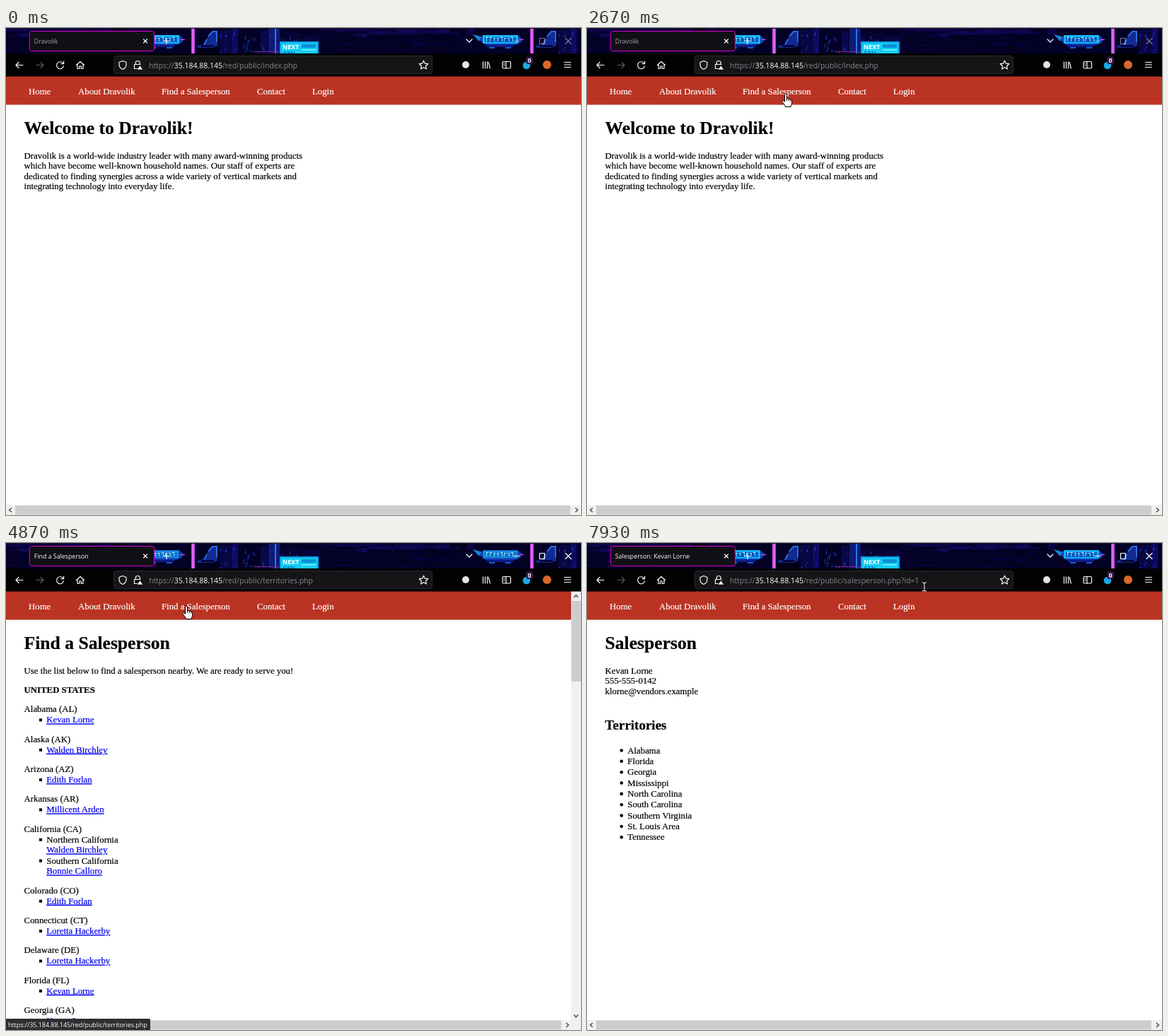
An HTML page that plays this animation: 813 by 689 pixels, repeating every 8 s.

```html
<!DOCTYPE html>
<html lang="en">
<head>
<meta charset="utf-8">
<title>Browser session</title>
<style>
html, body { margin: 0; width: 100%; height: 100%; overflow: hidden; background: #fff; }
#stage { position: absolute; left: 0; top: 0; width: 813px; height: 689px; overflow: hidden; }
svg { position: absolute; left: 0; top: 0; display: block; }
text { white-space: pre; }
.page text { font-family: "Liberation Serif", "Times New Roman", serif; stroke: #000; stroke-width: .2; }
.page .nav { fill: #fff; stroke: #fff; }
.page .link { fill: #0000ee; stroke: #0000ee; text-decoration: underline; }
.ui, #status { font-family: "Open Sans", "Noto Sans", sans-serif; }
.icon { fill: none; stroke: #fbfbfe; stroke-width: 1.2; stroke-linecap: round; stroke-linejoin: round; }
#status {
  position: absolute; left: 0; top: 673px; height: 16px; padding: 0 4px 0 3px;
  border-radius: 0 2px 0 0; background: #2e2e31; color: #fbfbfe;
  font-size: 8.9px; line-height: 17px; white-space: pre;
}
</style>
</head>
<body>
<div id="stage">
  <svg id="screen" width="813" height="689" viewBox="0 0 813 689"></svg>
  <div id="status"></div>
  <svg id="pointer" width="813" height="689" viewBox="0 0 813 689">
    <g id="cursor" stroke="#000" fill="#fff" stroke-width="1" stroke-linejoin="round">
      <path id="arrow" d="M0 0V15.5L3.6 12.2L6 18L8.6 16.9L6.2 11.3H11Z"/>
      <g id="hand">
        <path d="M-1.5 1.3a1.5 1.5 0 0 1 3 0V6.8q2-.8 2.8.6q2-.6 2.6.8q1.7-.3 1.8 1.6V13q0 2-1.4 3.6V18.5H-.8V17L-5 11.5q-.8-1.8.8-2q1-.1 2.7 1.9Z"/>
        <path d="M1.5 6.8V10M4.3 7.5V10.3M6.9 8.3V10.6" fill="none"/>
      </g>
      <path id="beam" fill="none" stroke="#fff" d="M-3 -6H-1L0 -5L1 -6H3M0 -5V5M-3 6H-1L0 5L1 6H3"/>
    </g>
  </svg>
</div>
<script>
const LOOP = 8000;
const HOST = '35.184.88.145';
const COMPANY = 'Dravolik';
const SELLER = 'Kevan Lorne';
const $ = id => document.getElementById(id);

// Markup helpers
const rect = (x, y, w, h, fill, extra = '') =>
  `<rect x="${x}" y="${y}" width="${w}" height="${h}" fill="${fill}" ${extra}/>`;
const text = (x, y, str, size = 12.8, extra = '') =>
  `<text x="${x}" y="${y}" font-size="${size}" ${extra}>${str}</text>`;
const line = (d, extra = '') => `<path d="${d}" ${extra}/>`;
const bold = 'font-weight="bold"';

let seed = 11;
const rnd = n => {
  seed = (seed * 16807) % 2147483647;
  return Math.floor(seed / 2147483647 * n);
};
const scatter = (count, x, y, w, h, pw, ph, colors) => Array.from({ length: count }, () =>
  rect(x + rnd(w / 2) * 2, y + rnd(h), 1 + rnd(pw), 1 + rnd(ph), colors[rnd(colors.length)])).join('');

function cityTile() {
  const tower = (x, y, w, fill) => rect(x, y, w, 36 - y, fill)
    + scatter(w * .7, x + 1, y + 2, w - 3, 33 - y, 1, 5, ['#17239b', '#1b45c8', '#0a0640']);
  return rect(262, 0, 480, 36, '#040127')
    + rect(446, 0, 216, 9, '#0c0546')
    + scatter(46, 446, 0, 200, 11, 22, 4, ['#040127', '#110754', '#02011a'])
    + scatter(30, 446, 14, 196, 22, 26, 3, ['#020115', '#07023a'])
    + rect(262, 0, 5, 36, '#c64be0') + rect(264, 0, 1, 36, '#ef8bf3')
    + line('M270 25L280 23L285 13L291 5H299V25L288 30L271 28Z', 'fill="#122a91"')
    + line('M286 12L292 5H298V20M284 16L280 24', 'fill="none" stroke="#2b69e8" stroke-width="2"')
    + rect(269, 28, 31, 8, '#02001a') + rect(276, 24, 18, 3, '#060738')
    + tower(302, 3, 16, '#090645') + tower(319, 0, 9, '#0c0b63')
    + tower(331, 9, 28, '#040127') + tower(360, 4, 10, '#090848')
    + tower(371, 0, 16, '#0f1a78') + tower(388, 6, 30, '#060334')
    + tower(420, 10, 24, '#08043c') + rect(380, 0, 2, 36, '#2878e8')
    + rect(350, 33, 36, 1, '#8a2478')
    + rect(387, 19, 55, 17, '#0a9fe0') + rect(389, 21, 51, 15, '#14cdf3')
    + rect(418, 23, 20, 5, '#0b8fd6') + rect(418, 30, 20, 2, '#62efff')
    + text(391, 30, 'NEXT', 9, 'class="ui" fill="#fff" ' + bold)
    + text(391, 38.5, 'GEN', 8.5, 'class="ui" fill="#0878c8" ' + bold)
    + line('M660 9L668 18H674V13Z', 'fill="#1488d8"')
    + line('M669 17L675 10H723L731 16L727 21L720 24H678Z', 'fill="#123ab6"')
    + rect(679, 24, 38, 3, '#0c1c81') + rect(683, 27, 8, 2, '#1b5ad8') + rect(706, 27, 8, 2, '#1b5ad8')
    + rect(725, 16, 7, 1, '#e14bd0')
    + rect(675, 11, 48, 10, '#1c7fd2')
    + '<g class="glow">' + rect(674, 10, 50, 12, '#15b9fa') + rect(677, 13, 44, 7, '#0d58bd') + '</g>'
    + Array.from({ length: 8 }, (_, i) => rect(679 + i * 5, 13 + rnd(2), 3, 1, '#b5f8ff')
      + rect(679 + i * 5 + rnd(3), 14, 1, 5, '#62e4ff')).join('');
}

function banner() {
  return `<defs><g id="city">${cityTile()}</g><clipPath id="bar"><rect width="813" height="36"/></clipPath></defs>
    <g clip-path="url(#bar)"><use href="#city" x="-479"/><use href="#city"/><use href="#city" x="479"/></g>`
    + rect(0, 0, 813, 1, '#17152a');
}

function chrome() {
  const controls = '<g id="controls" class="icon" stroke-linecap="butt">'
    + line('M754.5 14.5h7v8h-7zM791 14.5l8 8M799 14.5l-8 8M718 18.5h8') + '</g>';
  return banner()
    + rect(33.5, 4.5, 176, 28, '#100f16', 'rx="3" stroke="#e000d0"')
    + '<text id="tab" class="ui" y="22" font-size="8.8"></text>'
    + '<circle id="dot" cx="50.5" cy="18.5" r="1.2" fill="#ddd"/>'
    + '<g class="icon">' + line('M194.5 16l5 5M199.5 16l-5 5M223 18.5h8M227 14.5v8M651 16l4 4l4-4') + '</g>'
    + controls
    + rect(0, 36, 813, 32.6, '#020203')
    + rect(152.5, 39.5, 450, 25, '#151517', 'rx="3" stroke="#29292c"')
    + '<g class="icon">'
    + line('M24 52.5H14M18 48.5l-4 4l4 4')
    + line('M43 52.5H53M49 48.5l4 4l-4 4', 'stroke="#5c5c62"')
    + '<g id="reload">' + line('M80.8 50a5 5 0 1 0 .7 3.8M81.6 47v3.6H78') + '</g>'
    + '<g id="stop">' + line('M72.5 48.5l8 8M80.5 48.5l-8 8') + '</g>'
    + line('M99.5 52.5l5.5-5l5.5 5M101 51.5V57.5H103.7V54H106.3V57.5H109V51.5')
    + line('M165 46.5l5 2v3q0 5-5 7q-5-2-5-7v-3z')
    + line('M183.2 51V49.5a3 3 0 0 1 6 0V51M187 57.5H181.5V51.5H190')
    + line('M189.5 53l4 6h-8z', 'fill="#fbfbfe" stroke="#151517" stroke-width=".6"')
    + line('M590.5 46.2l1.9 4l4.3.5l-3.2 3l.9 4.3l-3.9-2.2l-3.9 2.2l.9-4.3l-3.2-3l4.3-.5z')
    + line('M674.5 47.5v10M677.5 47.5v10M680.5 47.5v10M682 48l2.5 9.5', 'stroke-linecap="butt"')
    + rect(702, 47.5, 11.5, 9.5, 'none', 'rx="1.5"') + line('M707 47.5V57M704 50h1M704 52.5h1')
    + line('M789.5 48.5h9M789.5 52h9M789.5 55.5h9')
    + '</g>'
    + '<circle cx="650" cy="52" r="5" fill="#e4e4e8"/><circle cx="736" cy="53" r="5.3" fill="#18a9e8"/><circle cx="765" cy="52" r="6" fill="#d9682a"/>'
    + '<g id="badge">' + rect(735.5, 40.5, 9.5, 10.5, '#3b174f', 'rx="2"')
    + text(740.2, 49, '0', 8.4, 'class="ui" text-anchor="middle" fill="#fff" ' + bold) + '</g>'
    + `<text class="ui" x="202" y="56.7" font-size="10.48" fill="#85858c">https://<tspan fill="#fbfbfe">${HOST}</tspan><tspan id="path"></tspan></text>`;
}

const navLinks = [[32, 'Home'], [102, 'About ' + COMPANY], [220, 'Find a Salesperson'], [355, 'Contact'], [433, 'Login']];
const bar = width => rect(0, 68, width, 40.6, '#bb3323')
  + navLinks.map(([x, label]) => text(x, 94.3, label, 12.8, 'class="nav"')).join('');
const heading = label => text(25.6, 150, label, 25.6, bold);
const paragraph = lines => lines.map((str, i) => text(25.6, 184.8 + i * 14.4, str)).join('');
const chevron = d => line(d, 'fill="none" stroke="#505050" stroke-width="1.6"');
const bottomScroll = end => rect(0, 675, 813, 14, '#f0f0f0') + rect(13, 675.5, end - 13, 13, '#cdcdcd')
  + chevron(`M8 679l-3.3 3l3.3 3M${end + 7} 679l3.3 3l-3.3 3`);

function homePage() {
  return bar(813) + heading(`Welcome to ${COMPANY}!`) + paragraph([
    `${COMPANY} is a world-wide industry leader with many award-winning products`,
    'which have become well-known household names. Our staff of experts are',
    'dedicated to finding synergies across a wide variety of vertical markets and',
    'integrating technology into everyday life.'
  ]) + bottomScroll(798);
}

function territoriesPage() {
  const walden = 'Walden Birchley', edith = 'Edith Forlan', loretta = 'Loretta Hackerby';
  const states = [
    ['Alabama (AL)', SELLER], ['Alaska (AK)', walden], ['Arizona (AZ)', edith],
    ['Arkansas (AR)', 'Millicent Arden'],
    ['California (CA)', walden, 'Northern California', 'Bonnie Calloro', 'Southern California'],
    ['Colorado (CO)', edith], ['Connecticut (CT)', loretta], ['Delaware (DE)', loretta],
    ['Florida (FL)', SELLER], ['Georgia (GA)', SELLER]
  ];
  const bullet = y => rect(47, y - 6, 4, 4, '#000');
  const link = (y, name) => text(57.3, y, name, 12.8, 'class="link"');
  let y = 239.2, list = '';
  for (const [state, first, area, second, area2] of states) {
    list += text(25.6, y, state) + bullet(y + 15.2);
    if (area) {
      list += text(57.3, y + 15.2, area) + link(y + 29.8, first)
        + bullet(y + 45) + text(57.3, y + 45, area2) + link(y + 59.8, second);
      y += 44.6;
    } else list += link(y + 15.2, first);
    y += 42.35;
  }
  return bar(799) + heading('Find a Salesperson')
    + paragraph(['Use the list below to find a salesperson nearby. We are ready to serve you!'])
    + text(25.6, 212, 'UNITED STATES', 12.8, bold) + list + bottomScroll(785)
    + rect(799, 69, 14, 606, '#f0f0f0') + rect(799.5, 82, 13.5, 114, '#cdcdcd')
    + chevron('M803 77l3-3.3l3 3.3M803 667.5l3 3.3l3-3.3');
}

function salesPage() {
  const areas = ['Alabama', 'Florida', 'Georgia', 'Mississippi', 'North Carolina',
    'South Carolina', 'Southern Virginia', 'St. Louis Area', 'Tennessee'];
  return bar(813) + heading('Salesperson')
    + paragraph([SELLER, '555-555-0142', 'klorne@vendors.example'])
    + text(25.6, 264, 'Territories', 19, bold)
    + areas.map((area, i) => {
      const y = 297.5 + i * 15.35;
      return `<circle cx="48.8" cy="${y - 4}" r="2.3"/>` + text(57.3, y, area);
    }).join('') + bottomScroll(798);
}

const pages = [
  { from: 0, id: 'home', title: COMPANY, path: '/red/public/index.php', draw: homePage },
  { from: 3400, id: 'territories', title: 'Find a Salesperson', path: '/red/public/territories.php', draw: territoriesPage },
  { from: 6850, id: 'sales', title: 'Salesperson: ' + SELLER, path: '/red/public/salesperson.php?id=1', draw: salesPage }
];
$('screen').innerHTML = rect(0, 0, 813, 689, '#fff')
  + pages.map(p => `<g class="page" id="${p.id}">${p.draw()}</g>`).join('') + chrome();

const ACTIVE_FROM = 2930;
const loads = [[2990, 4200], [6550, 7130]];
// start, end, label, fade-in, fade-out
const messages = [
  [2990, 3400, `Waiting for ${HOST}...`, 1, 1],
  [3400, 4200, `Transferring data from ${HOST}...`, 1, 1],
  [4200, 5620, `https://${HOST}/red/public/territories.php`, 1, 140],
  [6060, 6550, `https://${HOST}/red/public/salesperson.php?id=1`, 140, 1],
  [6550, 6850, `Waiting for ${HOST}...`, 1, 1],
  [6850, 7130, `Transferring data from ${HOST}...`, 1, 1]
];
// time, x, y, shape
const moves = [
  [1930, 360, 646, 'arrow'], [2000, 345, 390, 'arrow'], [2130, 318, 215, 'arrow'],
  [2270, 298, 122, 'arrow'], [2400, 285, 98, 'hand'], [2600, 281, 93, 'hand'],
  [2960, 281, 93, 'hand'], [3400, 255, 89, 'hand'], [5200, 255, 89, 'hand'],
  [5330, 238, 160, 'arrow'], [5400, 225, 216, 'arrow'], [5620, 150, 238, 'arrow'],
  [5850, 100, 252, 'hand'], [6000, 95, 253, 'hand'], [6850, 95, 253, 'beam'],
  [7230, 100, 258, 'arrow'], [7500, 280, 150, 'arrow'], [7730, 450, 75, 'arrow'],
  [7800, 470, 64, 'beam'], [7860, 477, 62, 'beam'], [LOOP, 477, 62, 'beam']
];
const show = (id, on) => { $(id).style.display = on ? '' : 'none'; };
const clamp = v => Math.max(0, Math.min(1, v));

function placeCursor(t) {
  const i = moves.findLastIndex(m => m[0] <= t);
  show('cursor', i >= 0);
  if (i < 0) return;
  const [t0, x0, y0, shape] = moves[i];
  const [t1, x1, y1] = moves[Math.min(i + 1, moves.length - 1)];
  const k = t1 > t0 ? (t - t0) / (t1 - t0) : 0;
  $('cursor').setAttribute('transform', `translate(${x0 + (x1 - x0) * k} ${y0 + (y1 - y0) * k})`);
  for (const id of ['arrow', 'hand', 'beam']) show(id, id === shape);
  $('beam').setAttribute('stroke', y0 > 69 ? '#000' : '#fff');
}

function render(t) {
  const page = pages.findLast(p => p.from <= t);
  const loading = loads.some(([a, b]) => t >= a && t < b);
  const active = t >= ACTIVE_FROM;
  for (const p of pages) show(p.id, p === page);
  $('path').textContent = page.path;
  $('tab').textContent = page.title;
  $('tab').setAttribute('x', loading ? 57 : 39.8);
  $('tab').setAttribute('fill', active ? '#fbfbfe' : '#a5a5ab');
  $('controls').style.opacity = active ? 1 : .45;
  show('dot', loading);
  show('stop', loading);
  show('reload', !loading);
  show('badge', !loading);

  const msg = messages.find(([a, b]) => t >= a && t < b);
  show('status', msg);
  if (msg) {
    const [a, b, label, fadeIn, fadeOut] = msg;
    $('status').textContent = label;
    $('status').style.opacity = Math.min(clamp((t - a + 1) / fadeIn), clamp((b - t) / fadeOut));
  }

  const step = Math.floor(t / 66) * 66;
  document.querySelector('.glow').style.opacity = .6 + .4 * Math.cos(step / 890 * 2 * Math.PI);
  placeCursor(t);
}

const start = performance.now();
function tick() {
  render((performance.now() - start) % LOOP);
  requestAnimationFrame(tick);
}
tick();
</script>
</body>
</html>
```
